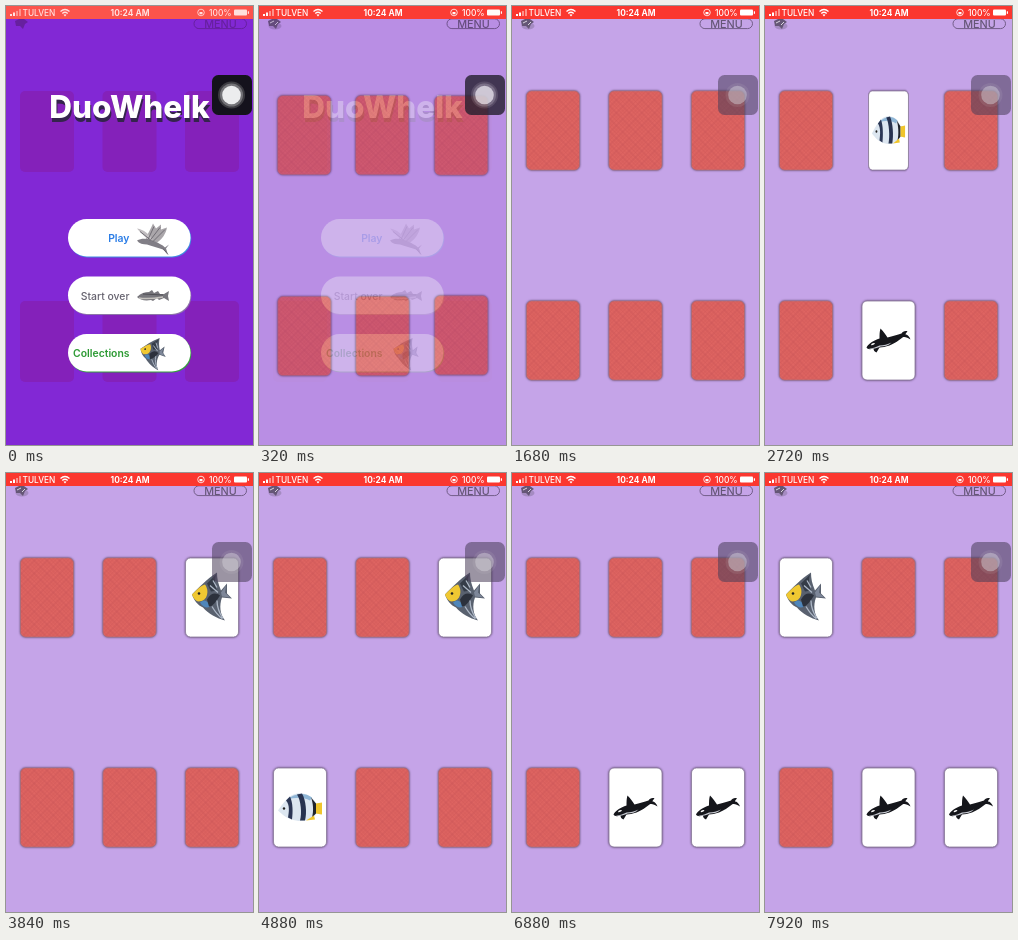
An HTML page for the animation above (8 s loop, 247 by 439 pixels).

```html
<!DOCTYPE html>
<html lang="en">
<head>
<meta charset="utf-8">
<title>Memory game</title>
<style>
html, body { margin: 0; width: 100%; height: 100%; overflow: hidden; background: #c5a4e8; }
svg { display: block; width: 100vw; height: 100vh; }
text { font-family: Inter, Roboto, sans-serif; }
.card { filter: drop-shadow(0 .7px .9px rgba(50, 35, 60, .75)); }
</style>
</head>
<body>
<svg viewBox="0 0 247 439" preserveAspectRatio="none">
  <defs>
    <pattern id="weave" width="9" height="9" patternUnits="userSpaceOnUse" patternTransform="rotate(45)">
      <rect width="9" height="9" fill="#df6562"/>
      <path d="M0 1H9M1 0V9" stroke="#c85154" stroke-width=".7"/>
      <path d="M0 4H9M4 0V9M0 6.5H9M6.5 0V9" stroke="#d15858" stroke-width=".5"/>
    </pattern>

    <g id="orca">
      <path d="M-22 7C-20 3-15 0-9-2C-9-6-9-9-8-12C-5-9-3-6-1-3C4-4 9-6 13-7C14-9 17-10 19-9C18-8 17-7 17-6C19-6 21-4 22-1C19-3 16-4 14-3C10 0 6 3 1 5C-3 6-6 7-9 7L-12 12C-14 11-15 10-15 8C-18 9-21 9-22 7Z" fill="#15161b"/>
      <path d="M-20 8C-15 8-12 6-9 5C-5 5-1 4 3 2C0 5-4 6-8 6C-12 8-17 9-20 8Z" fill="#c9ccd4"/>
      <ellipse cx="-15.500" cy="3.600" rx="2" ry=".8" transform="rotate(-24 -15.500 3.600)" fill="#fff"/>
    </g>

    <g id="angel">
      <path d="M-20-3C-14-9-6-18 5-25C5-19 6-14 9-7L15-14C15-10 15-7 15-4L20 1L10 0C7 8 8 17 13 23C5 21-4 16-9 10C-14 8-18 3-20-3Z" fill="#59616f"/>
      <path d="M-20-3C-15-8-11-12-7-13C-4-9-4-4-6 0C-8 3-11 4-14 4C-17 3-19 0-20-3Z" fill="#f0c832"/>
      <path d="M-12 5C-8 1-4 3-2 9C-5 11-9 10-12 5Z" fill="#4f86ba"/>
      <path d="M-5 2C-1-5 4-5 8-2C4 4 1 9-3 9Z" fill="#2c313c"/>
      <path d="M-5-14L4-23C2-16 3-11 5-7L-1-6Z" fill="#353c48"/>
      <path d="M9-5L14-12L13-5L18 0L10-1Z" fill="#7e8799"/>
      <path d="M0 9C3 14 6 18 10 21M5 3C5 10 7 15 11 21M-2-12L6-5M1-17L5-10" fill="none" stroke="#aeb8c7" stroke-width="1.300"/>
      <circle cx="-13" cy="-4" r="1.300" fill="#222"/>
    </g>

    <g id="banded">
      <path d="M-22 3C-17-4-11-13-3-14C6-15 13-11 16-4L22-4L21 7L16 6C12 12 4 15-4 13C-12 12-18 7-22 3Z" fill="#dce6f0"/>
      <path d="M-13-8C-6-14 4-16 12-10L10-7C3-11-5-10-13-8Z" fill="#8fb6d6"/>
      <path d="M-14-7C-10-3-11 5-12 10L-8 12C-7 5-7-5-10-11Z" fill="#2b3654"/>
      <path d="M-3-13C1-7 2 6 0 13L5 13C7 5 6-7 2-14Z" fill="#27324f"/>
      <path d="M11-10C13-5 14 3 12 10L16 6L16-4Z" fill="#20242c"/>
      <path d="M16-4L22-5L22 7L16 6ZM6 13L14 8L15 12Z" fill="#f0c52c"/>
      <circle cx="-16" cy="1" r="1.200" fill="#222"/>
    </g>

    <g id="flyer">
      <path d="M-8 2C-6-4-2-10 0-15L3-10L8-14L8-9L14-11C13-5 9 1 4 4Z" fill="#aaa6aa"/>
      <path d="M-16-10C-9-9-4-4 0 1L-4 2C-8-2-13-6-16-10Z" fill="#c1bdc0"/>
      <path d="M-16 2C-11-1-4 0 2 3C6 5 9 6 12 9L16 6L13 10L15 16L10 11C5 9-1 8-6 6C-10 6-14 5-16 2Z" fill="#817e86"/>
      <path d="M-5 1L1-12M-3 2L7-11M0 3L12-9M-13-7L-3 1M10 10L15 16" fill="none" stroke="#615e66" stroke-width=".8"/>
    </g>

    <g id="cod">
      <path d="M-16 1C-12-3-8-4-4-4L-1-6L1-3L5-5L7-2L11-2L16-5L15 0L16 5L11 2L6 4L4 2L0 5L-2 4C-8 5-13 4-16 1Z" fill="#77767c"/>
      <path d="M-14 2C-8 3-2 3 10 1" stroke="#c4c1bd" stroke-width="1.500" fill="none"/>
      <path d="M-10-2L10-1" stroke="#4c4b52" stroke-width=".9"/>
    </g>

    <g id="header">
      <path d="M9 15L13 13H18L22 16L19 18L17 23L14 20L10 20Z"/>
      <rect x="188" y="12.800" width="52.500" height="9.800" rx="4.900" fill="none" stroke="currentColor"/>
      <text x="214.500" y="21.800" font-size="10.800" font-weight="500" text-anchor="middle">MENU</text>
    </g>
  </defs>

  <rect width="247" height="439" fill="#c5a4e8"/>
  <ellipse cx="16" cy="20" rx="6.500" ry="3.500" fill="#a58bc2"/>
  <use href="#header" fill="#655676" color="#725d88"/>
  <path d="M11 17L15 15M16 19L19 16" stroke="#d9d5de"/>
  <g id="cards"></g>

  <g id="menu">
    <rect width="247" height="439" fill="#8228d5"/>
    <g id="ghosts" fill="#8421ba"></g>
    <use href="#header" fill="#67209f" color="#67209f"/>
    <g font-size="31.500" font-weight="800" text-anchor="middle">
      <text x="124.500" y="115.500" fill="#35244d">DuoWhelk</text>
      <text x="123.500" y="112" fill="#fff">DuoWhelk</text>
    </g>
    <g id="pills" font-size="10.400" text-anchor="end"></g>
  </g>

  <rect width="247" height="13" fill="#fb372f"/>
  <g fill="#fff">
    <path d="M4 10V8H6V10ZM7 10V6.500H9V10Z"/>
    <path d="M10 10V5H12V10ZM13 10V3H15V10Z" opacity=".45"/>
    <text x="16.500" y="9.700" font-size="8.300" font-weight="500">TULVEN</text>
    <g fill="none" stroke="#fff" stroke-width="1.300">
      <path d="M54.500 5.500Q59 1.500 63.500 5.500M56.300 7.500Q59 5 61.700 7.500"/>
      <circle cx="195" cy="6.500" r="3.300" stroke-width=".8"/>
    </g>
    <path d="M57.500 8.800Q59 7.600 60.500 8.800L59 10.400ZM193.500 6H196.500V8.300H193.500Z"/>
    <text x="124" y="9.700" font-size="8.400" font-weight="700" text-anchor="middle">10:24 AM</text>
    <text x="203" y="9.700" font-size="8.400" font-weight="500">100%</text>
    <rect x="228" y="3.500" width="13" height="6" rx="1"/>
    <rect x="241.800" y="5.300" width="1.200" height="2.500"/>
  </g>
  <rect id="tint" width="247" height="13" fill="#ff9690"/>

  <rect x="206" y="69" width="40" height="40" rx="6.500" fill="#4a3d58" opacity=".55"/>
  <g fill="#d8d4dc">
    <circle cx="225.500" cy="89" r="12" opacity=".1"/>
    <circle cx="225.500" cy="89" r="9.300" opacity=".45"/>
  </g>
  <g id="knob">
    <rect x="206" y="69" width="40" height="40" rx="6.500" fill="#14121c"/>
    <circle cx="225.500" cy="89" r="13.500" fill="#3d3c42"/>
    <circle cx="225.500" cy="89" r="11.500" fill="#747378"/>
    <circle cx="225.500" cy="89" r="9.300" fill="#ececee"/>
  </g>
</svg>
<script>
const LOOP = 8000, FLIP = 520, MID = { x: 123.5, y: 229.5 };
const $ = id => document.getElementById(id);
const clamp = v => Math.max(0, Math.min(1, v));
const span = (t, start, len) => clamp((t - start) / len);
const smooth = p => (1 - Math.cos(Math.PI * p)) / 2;
const easeOut = p => 1 - (1 - p) * (1 - p);
const mix = (a, b, p) => a + (b - a) * p;

function add(parent, tag, attrs, html = '') {
  const el = document.createElementNS('http://www.w3.org/2000/svg', tag);
  for (const k in attrs) el.setAttribute(k, attrs[k]);
  el.innerHTML = html;
  parent.append(el);
  return el;
}

// pile: offset in the gathered heap; turns: times at which the card flips over
const deck = [
  { x: 41, y: 124.5, pile: [10, -3], fish: 'angel', turns: [7120] },
  { x: 206, y: 124.5, pile: [0, 6], fish: 'angel', turns: [3280, 5280] },
  { x: 123.5, y: 124.5, pile: [-8, -2], fish: 'banded', turns: [2366, 3280] },
  { x: 41, y: 334.5, pile: [13, 8], fish: 'banded', turns: [4240, 5280] },
  { x: 206, y: 334.5, pile: [0, -8], fish: 'orca', turns: [5285] },
  { x: 123.5, y: 334.5, pile: [0, 8], fish: 'orca', turns: [1640, 3280, 6240] }
];

const box = 'x="-26.5" y="-39.5" width="53" height="79" rx="5"';
for (const c of deck) {
  c.el = add($('cards'), 'g', { class: 'card' });
  c.back = add(c.el, 'g', {}, `<rect ${box} fill="url(#weave)" stroke="#a8707c" stroke-width=".7"/>`);
  c.face = add(c.el, 'g', {}, `<rect ${box} fill="#fff" stroke="#8b7a9b" stroke-width=".8"/><use href="#${c.fish}"/>`);
  add($('ghosts'), 'rect', { x: c.x - 27, y: c.y - 39.5, width: 54, height: 81, rx: 5 });
}

const pills = [
  ['Play', 213, '#2b7de6', 600, 'flyer', '', '#3f8be0'],
  ['Start over', 270.5, '#66636f', 500, 'cod', '', '#8d76a8'],
  ['Collections', 328, '#2c9a33', 600, 'angel', 'scale(.66) rotate(12)', '#35a03c']
];
for (const [label, y, color, weight, fish, form, edge] of pills) {
  const pill = (dx, dy, fill) =>
    `<rect x="${62 + dx}" y="${y + dy}" width="122.5" height="37.5" rx="18.700" fill="${fill}"/>`;
  add($('pills'), 'g', {}, `
    ${pill(.8, 1, edge)}${pill(0, 0, '#fff')}
    <text x="123.500" y="${y + 23}" fill="${color}" font-weight="${weight}">${label}</text>
    <g transform="translate(147 ${y + 19.5}) ${form}"><use href="#${fish}"/></g>`);
}

function draw(t) {
  const menu = 1 - smooth(span(t, 0, 440));
  $('menu').setAttribute('opacity', menu);
  $('tint').setAttribute('opacity', menu * .3);
  $('knob').setAttribute('opacity', 1 - smooth(span(t, 60, 560)));

  const spread = t < 600 ? 1 - smooth(span(t, 280, 300)) : easeOut(span(t, 600, 510));
  for (const c of deck) {
    const turn = c.turns.reduce((sum, s) => sum + smooth(span(t, s, FLIP)), 0);
    const cos = Math.cos(turn * Math.PI);
    const x = mix(MID.x + c.pile[0], c.x, spread);
    const y = mix(MID.y + c.pile[1], c.y, spread);
    c.el.setAttribute('transform', `translate(${x} ${y}) scale(${Math.max(.01, Math.abs(cos))} 1)`);
    c.back.style.display = cos >= 0 ? '' : 'none';
    c.face.style.display = cos < 0 ? '' : 'none';
  }
}

const t0 = performance.now();
function tick() {
  draw((performance.now() - t0) % LOOP);
  requestAnimationFrame(tick);
}
tick();
</script>
</body>
</html>
```
